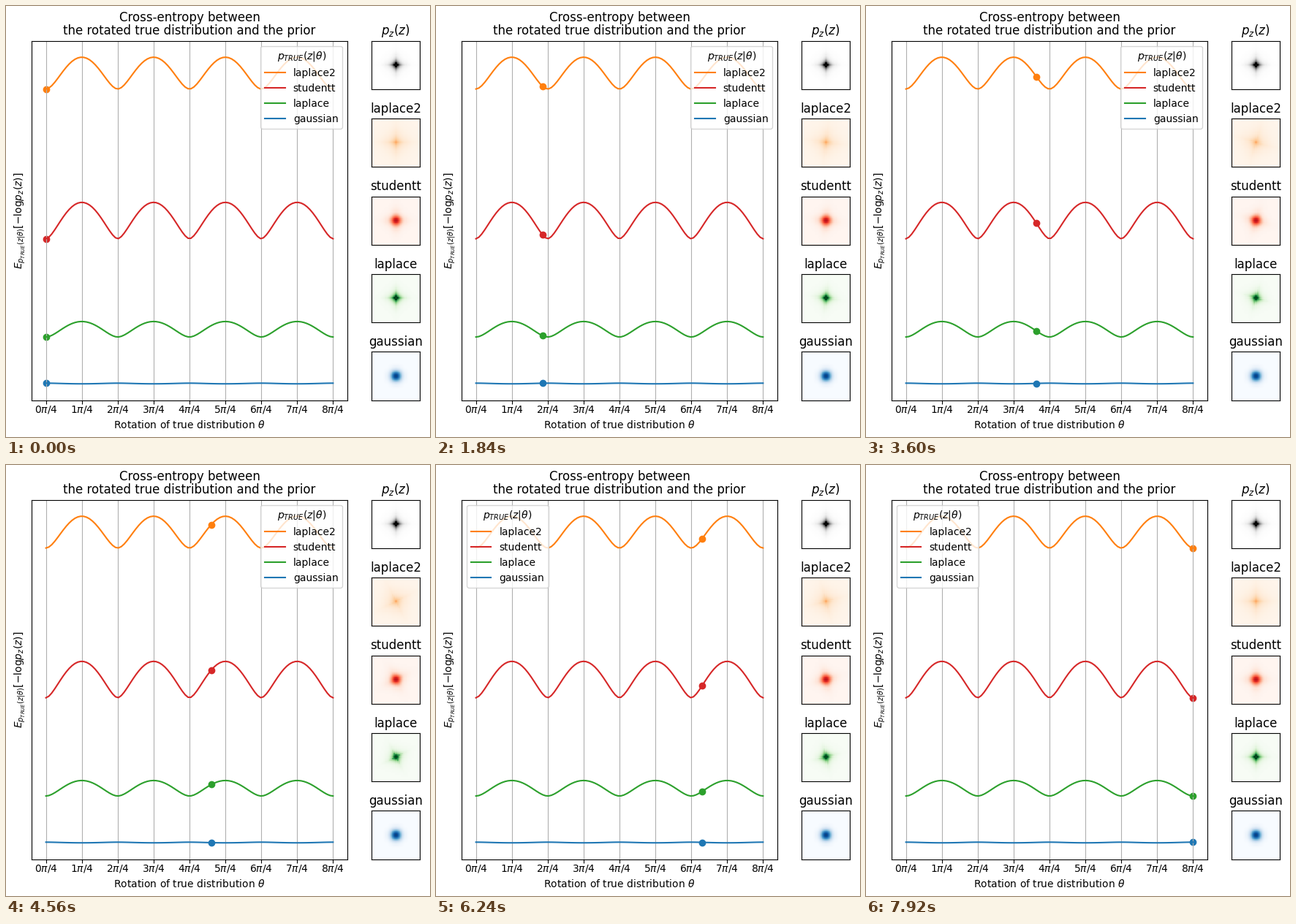
Write a matplotlib script that moves like this. It is 580 px wide and 590 px high and loops after 8000 ms.

```python
import numpy as np
import matplotlib.pyplot as plt
from matplotlib.animation import FuncAnimation

W, H, DPI = 580, 590, 100
FRAMES, INTERVAL = 100, 80
LEGEND_SWITCH = 74  # the marker reaches the legend here
LEFT, RIGHT, TOP, BOTTOM = 35, 467, 47.7, 539.6
PANEL_X, PANEL = 500, 66.2
VMAX = 0.17

plt.rcParams["font.family"] = "DejaVu Sans"
theta = np.linspace(0, 2 * np.pi, FRAMES)
grid = np.linspace(-6, 6, 31)
gx, gy = np.meshgrid(grid, grid)


def laplace(x, y, b=1):
    return np.exp(-(abs(x) + abs(y)) / b) / (4 * b * b)


def laplace2(x, y):
    return laplace(x, y, 2)


def gaussian(x, y):
    return np.exp(-(x * x + y * y) / 2) / (2 * np.pi)


def studentt(x, y):
    return 0.135 / ((1 + x * x / 3) * (1 + y * y / 3)) ** 2


def density(pdf, angle):
    c, s = np.cos(angle), np.sin(angle)
    return pdf(c * gx + s * gy, c * gy - s * gx)


def rise(angle):
    """Mean of |z| for a rotated Laplace pair, scaled to 0..1."""
    c, s = abs(np.cos(angle)), abs(np.sin(angle))
    peak = 1.5 / np.sqrt(2) - 1
    return np.clip(((1 + c * s) / (c + s) - 1) / peak, 0, 1)


def add_axes(x, y, w, h):
    ax = fig.add_axes([x / W, 1 - (y + h) / H, w / W, h / H])
    ax.set_yticks([])
    return ax


def add_panel(row, title, pdf, cmap):
    step = (BOTTOM - PANEL - TOP) / 4
    ax = add_axes(PANEL_X, TOP + row * step, PANEL, PANEL)
    ax.set_xticks([])
    ax.set_title(title)
    return ax.imshow(density(pdf, 0), cmap=cmap, vmin=0, vmax=VMAX,
                     origin="lower", aspect="auto", interpolation="nearest")


# name, density, line colour, colour map, start height, peak height, power
series = [
    ("laplace2", laplace2, "tab:orange", "Oranges", 113.6, 70.1, 1),
    ("studentt", studentt, "tab:red", "Reds", 318.6, 268.8, 0.9),
    ("laplace", laplace, "tab:green", "Greens", 453.1, 431.9, 1),
    ("gaussian", gaussian, "tab:blue", "Blues", 516.3, 517.2, 1),
]

fig = plt.figure(figsize=(W / DPI, H / DPI), dpi=DPI)
main = add_axes(LEFT, TOP, RIGHT - LEFT, BOTTOM - TOP)
add_panel(0, "$p_z(z)$", laplace, "Greys")

curves, dots, images = [], [], []
for row, (name, pdf, color, cmap, start, peak, power) in enumerate(series, 1):
    curve = H - (start + (peak - start) * rise(theta) ** power)
    main.plot(theta, curve, color=color, label=name)
    curves.append(curve)
    dots.append(main.scatter(theta[:1], curve[:1], color=color))
    images.append(add_panel(row, name, pdf, cmap))

main.set_xlim(-0.1 * np.pi, 2.1 * np.pi)
main.set_ylim(H - BOTTOM, H - TOP)
main.set_xticks(np.arange(9) * np.pi / 4, [rf"${i}\pi/4$" for i in range(9)])
main.tick_params(axis="x", pad=0.5)
main.grid(axis="x")
main.set_title("Cross-entropy between\nthe rotated true distribution and the prior",
               linespacing=1)
main.set_xlabel(r"Rotation of true distribution $\theta$")
main.set_ylabel(r"$E_{p_{TRUE}(z|\theta)}[-\mathrm{log}p_z(z)]$")
legend = main.legend(title=r"$p_{TRUE}(z|\theta)$", loc="upper right")


def update(frame):
    for spec, curve, dot, image in zip(series, curves, dots, images):
        dot.set_offsets([(theta[frame], curve[frame])])
        image.set_data(density(spec[1], theta[frame]))
    legend.set_loc("upper left" if frame >= LEGEND_SWITCH else "upper right")
    return [*dots, *images, legend]


anim = FuncAnimation(fig, update, frames=FRAMES, interval=INTERVAL,
                     repeat=True, repeat_delay=0)
plt.show()
```
